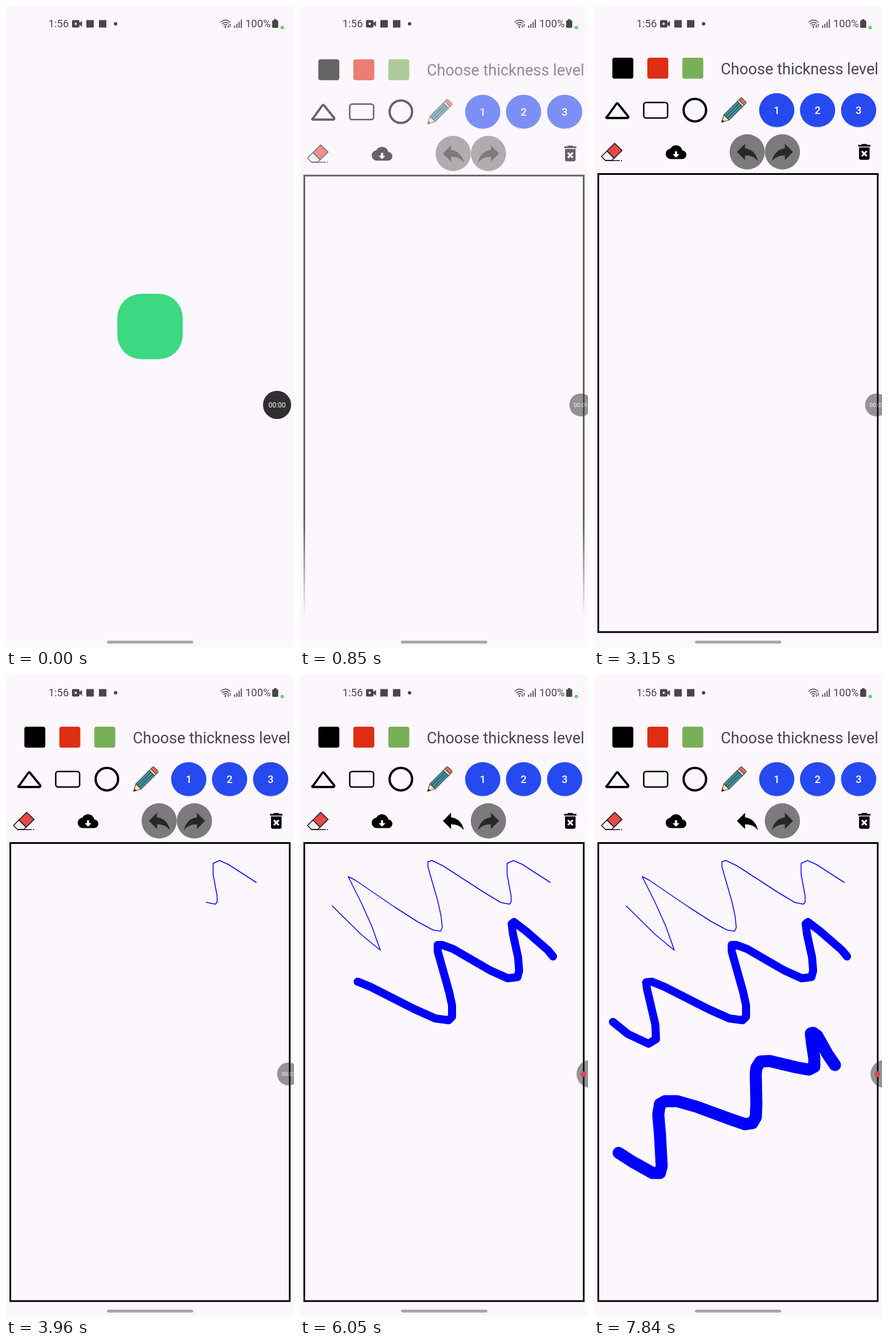
Recreate the animation shown at these times as an HTML page. Size 502 by 1116 pixels, loop 8000 ms.

```html
<!DOCTYPE html>
<html lang="en">
<head>
<meta charset="utf-8">
<title>Drawing pad</title>
<style>
  html, body { margin: 0; width: 100%; height: 100%; overflow: hidden; background: #fcf7fd; }
  svg { display: block; width: 502px; height: 1116px; }
  text { font-family: Roboto, sans-serif; }
  .status { fill: #49454a; font-size: 18.4px; }
  .line { fill: none; stroke: #000; }
  .ink { fill: none; stroke: #00f; stroke-linecap: round; stroke-linejoin: round; }
  .level { fill: #fff; font-size: 18.5px; font-weight: 500; text-anchor: middle; }
</style>
</head>
<body>
<svg viewBox="0 0 502 1116">
  <defs>
    <linearGradient id="wipe" gradientUnits="userSpaceOnUse" x1="0" x2="0" y1="0" y2="1">
      <stop offset="0" stop-color="#fff"/>
      <stop offset="1" stop-color="#000"/>
    </linearGradient>
    <mask id="reveal" maskUnits="userSpaceOnUse" x="0" y="0" width="502" height="1150">
      <rect width="502" height="1150" fill="url(#wipe)"/>
    </mask>
    <path id="arrow" d="M10 9V5l-7 7 7 7v-4.1c5 0 8.5 1.6 11 5.1-1-5-4-10-11-11z"/>
  </defs>
  <rect width="502" height="1116" fill="#fcf7fd"/>

  <rect id="splash" x="194" y="501" width="114" height="114" rx="42" fill="#3bd981"/>

  <g id="app">
    <rect x="32" y="90" width="36.5" height="36.5" rx="4"/>
    <rect x="93" y="90" width="36.5" height="36.5" rx="4" fill="#df2d13"/>
    <rect x="154" y="90" width="36.5" height="36.5" rx="4" fill="#78b058"/>
    <text x="221" y="118.5" font-size="27" fill="#49454c">Choose thickness level</text>

    <path class="line" d="M22 194L38.5 171Q40.5 168 42.5 171L59.500 192Q60.500 195 58 195H23Q20 195 22 193Z" stroke-width="3.8" stroke-linejoin="round"/>
    <rect class="line" x="86.700" y="168" width="41.600" height="27" rx="4" stroke-width="2.500"/>
    <circle class="line" cx="175.800" cy="181.300" r="19.600" stroke-width="4"/>
    <g transform="translate(222.500 202.500) rotate(-45)" stroke="#333" stroke-linejoin="round">
      <path d="M0 0L12 -6.500V6.500Z" fill="#f8e3b4"/>
      <path d="M12 -6.500H45V6.500H12Z" fill="#3f94a6"/>
      <path d="M12 -2.200H45M12 2.200H45" fill="none"/>
      <path d="M45 -6.500H49V6.500H45Z" fill="#e8dcc0"/>
      <path d="M49 -6.500H53Q55 -6.500 55 -4V4Q55 6.500 53 6.500H49Z" fill="#ee6a5b"/>
      <path d="M0 0L4 -2V2Z" fill="#333"/>
    </g>
    <g id="levels"></g>

    <g stroke="#111" stroke-width="1.500" stroke-linejoin="round">
      <path d="M36 239L49 251.500L35 265L22.500 252.500Z" fill="#e6494a"/>
      <path d="M22.500 252.500L35 265L30.500 269H20L13 262Z" fill="#eee"/>
      <path d="M20 269.300H45M47 269.300H49" fill="none"/>
    </g>
    <g transform="translate(125 236.500) scale(1.5)">
      <path d="M19.350 10.040C18.670 6.590 15.640 4 12 4 9.110 4 6.600 5.640 5.350 8.040 2.340 8.360 0 10.910 0 14c0 3.310 2.690 6 6 6h13c2.760 0 5-2.240 5-5 0-2.640-2.050-4.780-4.650-4.960z"/>
      <path d="M16 14.300l-4 4-4-4h2.700v-3.300h2.600v3.300z" fill="#fcf7fd"/>
    </g>
    <circle id="undoOff" cx="267" cy="254" r="30.700" fill="#7d7a7d"/>
    <use id="undo" href="#arrow" transform="translate(242.900 229.500) scale(2.040)"/>
    <circle cx="328.400" cy="254" r="30.700" fill="#7d7a7d"/>
    <use href="#arrow" fill="#292829" transform="translate(353.100 229.500) scale(-2.040 2.040)"/>
    <path transform="translate(452.800 235.600) scale(1.530)" d="M6 19c0 1.100.9 2 2 2h8c1.100 0 2-.9 2-2V7H6v12zm2.460-7.120l1.410-1.410L12 12.590l2.120-2.120 1.410 1.410L13.410 14l2.120 2.120-1.410 1.410L12 15.410l-2.120 2.120-1.410-1.410L10.590 14l-2.130-2.120zM15.500 4l-1-1h-5l-1 1H5v2h14V4z"/>

    <rect class="line" x="7.500" y="292.500" width="487" height="797.500" stroke-width="3"/>
    <g id="drawing"></g>
  </g>

  <g class="status">
    <text x="74" y="37">1:56</text>
    <rect x="115" y="24.500" width="13" height="13" rx="2"/>
    <path d="M128 29.500L132.500 26V36L128 32.500Z"/>
    <circle cx="121.500" cy="31" r="2" fill="#fcf7fd"/>
    <rect x="140" y="24.500" width="13" height="13"/>
    <rect x="162" y="24.500" width="13" height="13"/>
    <circle cx="191" cy="31" r="3"/>
    <g fill="none" stroke="#49454a" stroke-width="1.500">
      <path d="M374 28.500Q382.500 20.500 391 28.500M376.500 31.500Q382.500 26 388 30.500M379 34Q382.500 31 385.500 33.500"/>
      <path d="M387.500 32V37M386 35.500L387.500 37.500L389 35.500M390.800 37V32M389.300 33.500L390.800 31.500L392.300 33.500" stroke-width="1"/>
      <path d="M398.500 38V34M402.400 38V31M406.300 38V27.500M410.200 38V23.500" stroke-width="1.800"/>
    </g>
    <circle cx="382.300" cy="36.500" r="1.500"/>
    <text x="417" y="37">100%</text>
    <path d="M467 23H471.500V25H473Q474.500 25 474.500 26.500V36.500Q474.500 38 473 38H465.500Q464 38 464 36.500V26.500Q464 25 465.500 25H467Z"/>
    <circle cx="481.500" cy="37.500" r="2.200" fill="#7ee58a" stroke="#18d531" stroke-width="1.200"/>
  </g>

  <g id="bubble">
    <circle r="24.500" fill="#302e31"/>
    <text id="clock" y="4.300" font-size="12" text-anchor="middle" fill="#fff"></text>
  </g>
  <circle id="dot" cx="494" cy="695" r="4.800" fill="#d8475b"/>
  <rect x="176" y="1105" width="150.500" height="5" rx="2.500" fill="#a9a5aa"/>
</svg>
<script>
const LOOP = 8000;
const get = id => document.getElementById(id);
const set = (el, attrs) => { for (const k in attrs) el.setAttribute(k, attrs[k]); };
const add = (parent, tag, attrs) => {
  const el = document.createElementNS("http://www.w3.org/2000/svg", tag);
  set(el, attrs);
  return parent.appendChild(el);
};
const ramp = (t, a, b) => Math.min(1, Math.max(0, (t - a) / (b - a)));
const mix = (a, b, u) => a + (b - a) * u;
const show = (el, on) => set(el, { visibility: on ? "visible" : "hidden" });

const button = (label, x, press = Infinity) => {
  const body = { cx: x, rx: 30.7, ry: 29.5 };
  add(get("levels"), "ellipse", { ...body, cy: 182.8, fill: "#2040a0", opacity: 0.13 });
  const face = add(get("levels"), "ellipse", { ...body, cy: 181.3 });
  add(get("levels"), "text", { class: "level", x, y: 188 }).textContent = label;
  return { face, press };
};
const buttons = [button(1, 318.5), button(2, 389.7, 4860), button(3, 461.3, 6440)];

const stroke = (width, touch, start, end, power, points) => ({
  el: add(get("drawing"), "polyline", { class: "ink", "stroke-width": width }),
  touch, start, end, power,
  points: points.split(" ").map(p => p.split(",").map(Number))
});
const strokes = [
  stroke(1.5, 3240, 3710, 4430, 1.107,
    "436,361 408,343 388,330 372,323 361,328 361,347 368,385 368,395 365,399 350,396 " +
    "320,378 249,332 230,323 223,325 223,334 240,393 246,420 248,440 245,446 232,444 " +
    "204,429 165,404 96,357 84,351 107,397 125,437 140,479 136,476 107,452 56,402"),
  stroke(14, 5340, 5540, 6180, 1.217,
    "441,490 432,479 394,446 373,430 369,433 371,450 380,491 382,515 379,526 362,528 " +
    "331,514 267,477 248,470 240,470 240,481 260,552 265,575 265,595 259,601 236,598 " +
    "200,582 123,543 101,534 91,535 92,545 107,609 108,634 95,642 59,625 33,604"),
  stroke(21, 6960, 7160, 7840, 1.15,
    "420,679 407,660 389,628 382,623 378,624 380,642 384,667 384,682 374,687 352,683 " +
    "306,672 290,673 283,684 282,694 283,748 282,770 276,780 263,782 237,773 180,752 " +
    "145,742 124,742 115,747 112,765 115,800 118,855 115,867 102,867 68,848 43,832")
];

function drawStroke({ el, touch, start, end, power, points }, t) {
  show(el, t >= touch);
  const at = ramp(t, start, end) ** power * (points.length - 1);
  const i = Math.floor(at);
  const [a, b] = [points[i], points[i + 1] || points[i]];
  const tip = a.map((v, k) => mix(v, b[k], at - i));
  set(el, { points: [...points.slice(0, i + 1), tip].join(" ") });
}

function drawBubble(t) {
  const slide = 1 - (1 - ramp(t, 430, 1020)) ** 1.5;
  const shrink = ramp(t, 430, 810);
  const tuck = ramp(t, 4180, 4380);
  const x = mix(mix(472.5, 492.5, slide), 506, tuck);
  const r = mix(mix(24.5, 20, shrink), 24, tuck);
  set(get("bubble"), {
    transform: `translate(${x} 694.5) scale(${r / 24.5})`,
    opacity: mix(1, 0.5, shrink)
  });
  get("clock").textContent = "00:0" + [850, 1700, 3150].filter(s => t >= s).length;
  set(get("clock"), { opacity: 1 - tuck });
  set(get("dot"), { opacity: tuck });
}

function draw(t) {
  set(get("splash"), { opacity: 1 - ramp(t, 430, 570) });
  const front = (t - 560) * 3.64;
  set(get("wipe"), { y1: front - 165, y2: front });
  set(get("app"), {
    opacity: ramp(t, 600, 1020),
    transform: `translate(0 ${22 * (1 - ramp(t, 540, 1020)) ** 2})`,
    mask: t < 1020 ? "url(#reveal)" : "none"
  });

  for (const { face, press } of buttons) {
    const dark = t < press ? 0 : 1 - ramp(t, press + 200, press + 420);
    const rgb = [[38, 74, 240], [8, 24, 126]];
    set(face, { fill: `rgb(${rgb[0].map((c, i) => mix(c, rgb[1][i], dark))})` });
  }

  const canUndo = t >= 4410;
  show(get("undoOff"), !canUndo);
  set(get("undo"), { fill: canUndo ? "#000" : "#292829" });
  strokes.forEach(s => drawStroke(s, t));
  drawBubble(t);
}

const begin = performance.now();
function tick() {
  draw((performance.now() - begin) % LOOP);
  requestAnimationFrame(tick);
}
tick();
</script>
</body>
</html>
```
